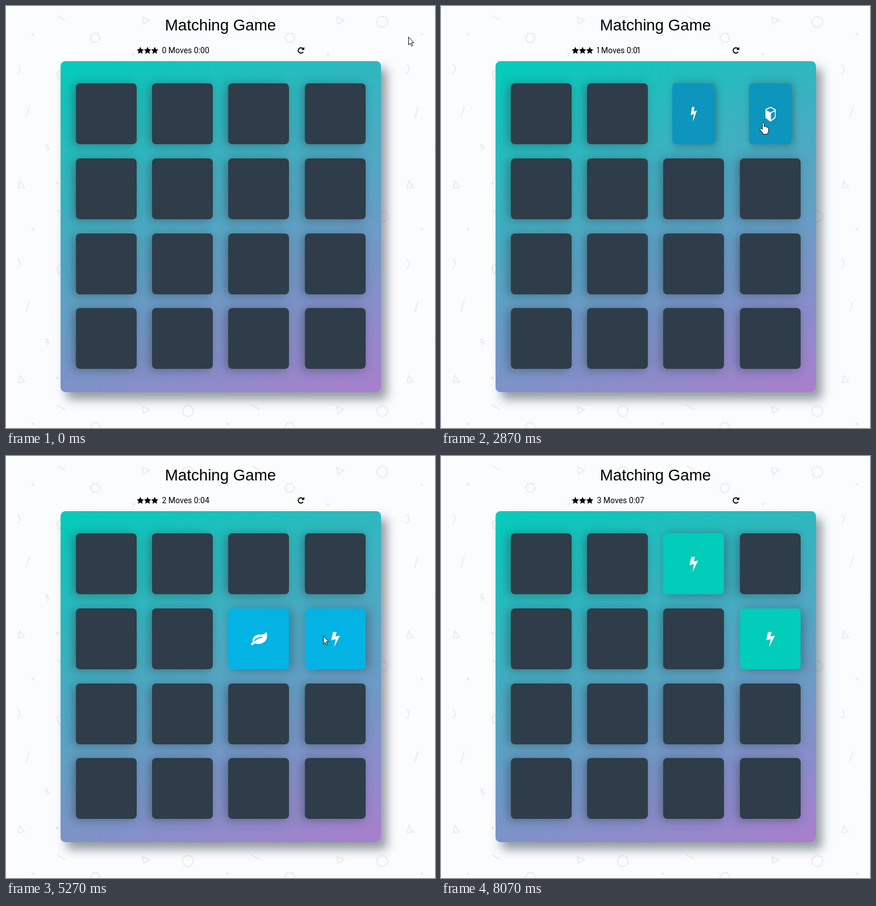
Recreate the animation shown at these times as an HTML page. Size 755 px wide and 742 px high, loop 8.87 s.

```html
<!DOCTYPE html>
<html lang="en">
<head>
<meta charset="utf-8">
<title>Matching Game</title>
<style>
html, body { margin: 0; width: 100%; height: 100%; overflow: hidden; }
body { position: relative; background: #fafcfe; }
svg { display: block; overflow: visible; }
.page { position: absolute; left: 0; top: 0; width: 755px; height: 742px; overflow: hidden; }
.back { position: absolute; left: 0; top: 0; }
.title { font: 27.7px "Liberation Sans", Arial, sans-serif; text-anchor: middle; }

.score {
  position: absolute; left: 274.5px; top: 68px; width: 110px; height: 20px;
  overflow: hidden; font: 14px/20px Roboto, sans-serif; white-space: nowrap;
}
.score div { height: 20px; }
.score i { font-style: normal; margin: 0 -2px; }
.strip { animation: count 8870ms step-end infinite; }

.deck {
  position: absolute; left: 96px; top: 97px; width: 564px; height: 582px;
  box-sizing: border-box; padding: 39px 0 0 27px; border-radius: 8.5px;
  background: linear-gradient(160deg, #02ccba 0%, #aa7ecd 100%);
  box-shadow: 10.3px 12.8px 17px rgba(46, 61, 73, .5);
  display: grid; grid-template: repeat(4, 107px) / repeat(4, 107px);
  gap: 24.8px 27.2px;
}
.card {
  position: relative; border-radius: 7px; background: #2e3d49;
  box-shadow: 4.3px 1.7px 17px rgba(46, 61, 73, .5);
  transform: rotateY(180deg); transform-style: preserve-3d;
}
.card svg {
  position: absolute; left: 38.5px; top: 38.5px; width: 30px; height: 30px;
  fill: #fff; fill-rule: evenodd; backface-visibility: hidden;
}
.bolt1 { animation: bolt1 8870ms ease infinite; }
.cube  { animation: cube  8870ms ease infinite; }
.leaf  { animation: leaf  8870ms ease infinite; }
.bolt2 { animation: bolt2 8870ms ease infinite; }

.cursor {
  position: absolute; left: -8px; top: -2px; width: 32px; height: 28px; overflow: hidden;
  animation: move 8870ms ease-in-out infinite;
}
.cursor svg { animation: pointer 8870ms step-end infinite; }

@keyframes bolt1 {
  0%, 11.951%, 36.979%, 70.519% { transform: rotateY(180deg); background: #2e3d49; }
  15.333%, 31.342%, 73.901%, 78.974% { transform: rotateY(0deg); background: #02b3e4; }
  84.611%, 100% { transform: rotateY(0deg); background: #02ccba; }
}
@keyframes cube {
  0%, 21.702%, 36.979%, 100% { transform: rotateY(180deg); background: #2e3d49; }
  25.085%, 31.342% { transform: rotateY(0deg); background: #02b3e4; }
}
@keyframes leaf {
  0%, 40.474%, 65.163%, 100% { transform: rotateY(180deg); background: #2e3d49; }
  43.856%, 59.527% { transform: rotateY(0deg); background: #02b3e4; }
}
@keyframes bolt2 {
  0%, 50.079%, 65.163%, 78.974% { transform: rotateY(180deg); background: #2e3d49; }
  53.461%, 59.527% { transform: rotateY(0deg); background: #02b3e4; }
  84.611%, 100% { transform: rotateY(0deg); background: #02ccba; }
}
@keyframes count {
  0% { transform: none; }
  21.702% { transform: translateY(-20px); }
  23.281% { transform: translateY(-40px); }
  34.555% { transform: translateY(-60px); }
  45.829% { transform: translateY(-80px); }
  50.079% { transform: translateY(-100px); }
  57.103% { transform: translateY(-120px); }
  68.32% { transform: translateY(-140px); }
  78.974% { transform: translateY(-160px); }
  79.594% { transform: translateY(-180px); }
  90.868%, 100% { transform: translateY(-200px); }
}
@keyframes move {
  0%, 1.127% { transform: translate(708px, 54px); }
  9.808%, 15.784% { transform: translate(452px, 177px); }
  19.504%, 33.484% { transform: translate(567px, 205px); }
  38.331%, 44.307% { transform: translate(450px, 313px); }
  49.38%, 59.752% { transform: translate(558px, 316px); }
  66.855%, 67.193% { transform: translate(456px, 199px); }
  68.32%, 73.281% { transform: translate(459px, 196px); }
  76.663% { transform: translate(569px, 314px); }
  86.133% { transform: translate(569px, 314px); animation-timing-function: linear; }
  90.53% { transform: translate(205px, 708px); animation-timing-function: step-end; }
  90.643%, 100% { transform: translate(160px, 800px); }
}
/* swaps arrow and hand */
@keyframes pointer {
  0%, 6.595%, 12.063%, 21.702%, 35.175%, 40.474%, 50.023%, 62.514%,
  70.575%, 78.918%, 88.286%, 89.741%, 100% { transform: none; }
  6.336%, 7.294%, 17.926%, 31.342%, 36.077%, 47.351%, 59.527%, 63.811%,
  75.175%, 87.102%, 88.591% { transform: translateX(-32px); }
}
</style>
</head>
<body>
<div class="page">
  <svg class="back" width="755" height="742">
    <defs>
      <pattern id="tile" width="342.2" height="342.2" patternUnits="userSpaceOnUse">
        <g fill="none" stroke="#e9ebed" stroke-width="2">
          <path d="M90 17l14 8M41 177l-6 19M21 103q9 8-1 16M69 243l5 2-4 4 6 1-4 5"/>
          <path d="M240 19.5l12.500 5.500-10.500 7zM24.500 307.500l8 11.500-11 1zM148.500 56l4.500-7.500h8.500l4.500 7.500-4.500 7.500h-8.500zM89.500 117l9-6 8 6-3 11h-11z"/>
          <circle cx="320" cy="28" r="9.500"/>
        </g>
        <g fill="#e9ebed">
          <circle cx="47.500" cy="50" r="2.400"/>
          <circle cx="224.500" cy="85" r="2.400"/>
          <circle cx="90.500" cy="312" r="2.400"/>
        </g>
      </pattern>
      <path id="star" d="M0-6.300L1.900-2.100 6.300-1.600 3.100 1.500 3.900 5.900 0 3.800-3.900 5.900-3.100 1.500-6.300-1.600-1.900-2.100z"/>
      <path id="bolt" d="M-4.500-12.500h6.500L-.400-4.500 7.800-6.300-2.700 14.200.300-.100-7.700 1.900z"/>
      <path id="cube" d="M0-13L12-8.700Q13-8.300 13-7V5Q13 6.300 12 6.900L1 12.900Q0 13.400-1 12.900L-12 6.900Q-13 6.300-13 5V-7Q-13-8.300-12-8.700zM0-11L-10.900-7 0-3 10.900-7zM1 10.500L11 5V-4.900L1-1.300z"/>
      <path id="leaf" d="M13-12.500C15-8 15.500-3 12 2.500 8 8-.500 9.500-4.500 8-7 7.200-8.500 7.800-9.600 9.600-10.800 11.300-12.500 11-13.500 9.500-14.600 8-14 7.400-12.600 6.500-11 5.500-10.400 4.500-10.900 2.500-11.700-3-6-7.500 0-7.900 5-8.200 9.500-7.800 13-12.500zM5.500-4C-1-4-5 -1.500-8 2-8.700 3.300-7.300 4-6.500 3.200-3 0 0-2 5.500-2Q7-3 5.500-4z"/>
    </defs>
    <rect width="755" height="742" fill="url(#tile)"/>
    <text class="title" x="377.500" y="42.500">Matching Game</text>
    <use href="#star" x="236.400" y="78"/>
    <use href="#star" x="249.100" y="78"/>
    <use href="#star" x="261.800" y="78"/>
    <path d="M522.600 75.100A4.700 4.700 0 1 0 523 80.600" fill="none" stroke="#000" stroke-width="1.900"/>
    <path d="M525 72v5.200h-5.300z"/>
  </svg>

  <div class="score">
    <div class="strip">
      <div>0 Moves 0:00</div>
      <div><i>1</i> Moves 0:00</div>
      <div><i>1</i> Moves 0:0<i>1</i></div>
      <div><i>1</i> Moves 0:02</div>
      <div><i>1</i> Moves 0:03</div>
      <div>2 Moves 0:03</div>
      <div>2 Moves 0:04</div>
      <div>2 Moves 0:05</div>
      <div>3 Moves 0:05</div>
      <div>3 Moves 0:06</div>
      <div>3 Moves 0:07</div>
    </div>
  </div>

  <div class="deck">
    <div class="card"></div>
    <div class="card"></div>
    <div class="card bolt1"><svg viewBox="-15 -15 30 30"><use href="#bolt"/></svg></div>
    <div class="card cube"><svg viewBox="-15 -15 30 30"><use href="#cube"/></svg></div>
    <div class="card"></div>
    <div class="card"></div>
    <div class="card leaf"><svg viewBox="-15 -15 30 30"><use href="#leaf"/></svg></div>
    <div class="card bolt2"><svg viewBox="-15 -15 30 30"><use href="#bolt"/></svg></div>
    <div class="card"></div>
    <div class="card"></div>
    <div class="card"></div>
    <div class="card"></div>
    <div class="card"></div>
    <div class="card"></div>
    <div class="card"></div>
    <div class="card"></div>
  </div>

  <div class="cursor">
    <svg width="64" height="28" viewBox="-8 -2 64 28" fill="#fff" stroke="#111" stroke-linejoin="round">
      <path d="M.500.500V14.300L3.600 11.400 5.800 16.500 7.900 15.600 5.700 10.600H9.800z"/>
      <path transform="translate(32)" d="M-1.500 11.500V1.500Q-1.500.200 0 .200T1.500 1.500V7Q3.800 5.800 4.500 7.700 6.600 6.800 7.200 8.700 9.500 8.200 9.500 10.500V14Q9.500 16.500 8 18.200V20.500H-.500V18.500L-5.300 12.600Q-6 11.200-4.800 10.500-3.500 9.800-1.500 12z"/>
    </svg>
  </div>
</div>
</body>
</html>
```
